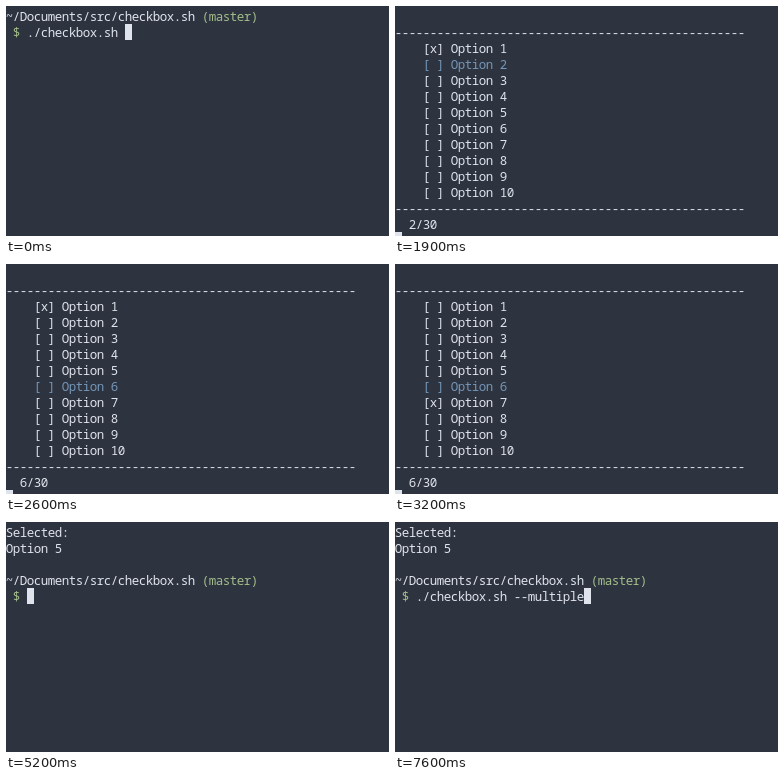
Recreate the animation shown at these times as an HTML page with a canvas. Size 383x230 px, loop 8000 ms.

```html
<!DOCTYPE html>
<html lang="en">
<head>
<meta charset="utf-8">
<title>Terminal checkbox menu</title>
<style>
  html, body { margin: 0; width: 100%; height: 100%; overflow: hidden; background: #2d333f; }
  canvas { display: block; width: 383px; height: 230px; }
</style>
</head>
<body>
<canvas id="screen"></canvas>
<script>
const W = 383, H = 230, LOOP = 8000;
const CELL_W = 7, CELL_H = 16, TOP = 2, BASELINE = 13;
const BG = '#2d333f', FG = '#dfe3ec', GREEN = '#a3be8c', BLUE = '#7596b8';
const COMMAND = './checkbox.sh ';

const canvas = document.getElementById('screen');
const ctx = canvas.getContext('2d');
const ratio = window.devicePixelRatio || 1;
canvas.width = Math.round(W * ratio);
canvas.height = Math.round(H * ratio);

// One glyph per terminal cell
function print(row, col, text, color = FG) {
  ctx.fillStyle = color;
  [...text].forEach((ch, i) => {
    if (ch !== ' ') ctx.fillText(ch, (col + i + 0.5) * CELL_W, TOP + row * CELL_H + BASELINE);
  });
}

function cursor(row, col) {
  ctx.fillStyle = FG;
  ctx.fillRect(col * CELL_W, TOP + row * CELL_H, CELL_W, CELL_H);
}

function prompt(row, command) {
  print(row, 0, '~/Documents/src/checkbox.sh');
  print(row, 28, '(master)', GREEN);
  print(row + 1, 1, '$', GREEN);
  print(row + 1, 3, command);
  cursor(row + 1, 3 + command.length);
}

function menu(active, checked) {
  const rule = '-'.repeat(50);
  print(1, 0, rule);
  for (let n = 1; n <= 10; n++) {
    const mark = n === checked ? 'x' : ' ';
    print(n + 1, 4, `[${mark}] Option ${n}`, n === active ? BLUE : FG);
  }
  print(12, 0, rule);
  print(13, 2, `${active}/30`);
  cursor(14, 0);
}

function result(command) {
  print(0, 0, 'Selected:');
  print(1, 0, 'Option 5');
  prompt(3, command);
}

// Start time, view, arguments
const steps = [
  [0, prompt, 0, COMMAND],
  [500, menu, 1, 0],
  [1600, menu, 1, 1],
  [1900, menu, 2, 1],
  [2200, menu, 3, 1],
  [2300, menu, 4, 1],
  [2500, menu, 5, 1],
  [2600, menu, 6, 1],
  [2800, menu, 7, 1],
  [2900, menu, 7, 7],
  [3200, menu, 6, 7],
  [3400, menu, 5, 7],
  [3800, menu, 5, 5],
  [5200, result, ''],
  [6900, result, COMMAND],
  [7100, result, ''],
  [7600, result, COMMAND + '--multiple']
];

function draw(time) {
  const [, view, ...args] = steps.findLast(([start]) => start <= time);
  ctx.setTransform(ratio, 0, 0, ratio, 0, 0);
  ctx.fillStyle = BG;
  ctx.fillRect(0, 0, W, H);
  ctx.font = '12.5px "Noto Sans Mono", "DejaVu Sans Mono", monospace';
  ctx.textAlign = 'center';
  ctx.textBaseline = 'alphabetic';
  view(...args);
}

const begin = performance.now();
function tick() {
  draw((performance.now() - begin) % LOOP);
  requestAnimationFrame(tick);
}
tick();
</script>
</body>
</html>
```
